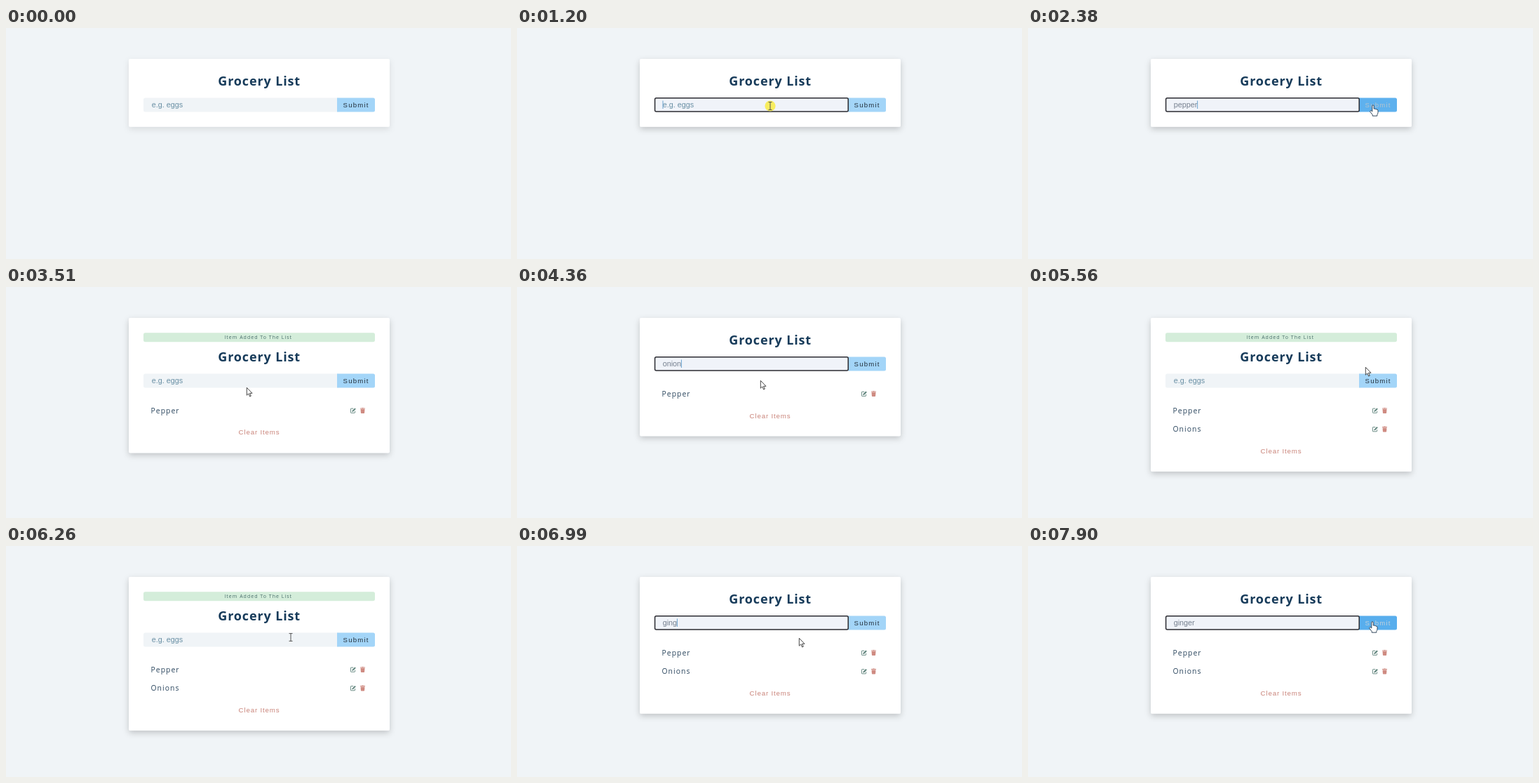
An HTML page for the animation above (8 s loop, 720x329 px).

```html
<!DOCTYPE html>
<html lang="en">
<head>
<meta charset="utf-8">
<title>Grocery List</title>
<style>
  html, body { margin: 0; width: 100%; height: 100%; overflow: hidden; background: #f0f4f7; }
  svg { display: block; width: 100vw; height: 100vh; }
  text { white-space: pre; }
  .sans { font-family: "Open Sans", "Noto Sans", sans-serif; }
  .ui { font-family: "Liberation Sans", Arial, sans-serif; }
  .title { font-size: 18px; font-weight: 700; letter-spacing: .86px; fill: #173b5a; }
  .note { font-size: 7px; letter-spacing: 1.02px; fill: #476c69; }
  .item { font-size: 10.4px; letter-spacing: 1.03px; fill: #2b465e; }
  .field { font-size: 10.8px; }
  .submit { font-size: 9.6px; letter-spacing: 1.2px; }
  .clear { font-size: 9.7px; letter-spacing: .84px; fill: #c98379; }
</style>
</head>
<body>
<svg viewBox="0 0 720 329">
  <defs>
    <filter id="shadow" x="-10%" y="-20%" width="120%" height="145%">
      <feDropShadow id="shade" dx="0" dy="3.3" stdDeviation="4.2" flood-color="#000"/>
    </filter>
    <g id="icons">
      <g transform="translate(490.7 147.8)">
        <path d="M4.6 1.4H1.3Q.7 1.4.7 2V7Q.7 7.6 1.3 7.6H6.3Q6.9 7.6 6.9 7V5" fill="none" stroke="#5d827a" stroke-width=".9"/>
        <path d="M2.9 4.5 6.7.7 8.1 2.1 4.3 5.9 2.7 6.1Z" fill="#5d827a"/>
      </g>
      <path transform="translate(505 147.8)" fill="#cf8b82" d="M0 .8H2L2.5.2H4.5L5 .8H7V1.8H0ZM.5 2.3H6.5L6.1 7.5Q6 8.2 5.4 8.2H1.6Q1 8.2.9 7.5Z"/>
    </g>
  </defs>
  <rect width="720" height="329" fill="#f0f4f7"/>
  <rect id="card" x="175" y="44" width="372" rx="2" fill="#fff" filter="url(#shadow)"/>
  <g id="note">
    <rect x="196" y="65.3" width="330" height="12.9" rx="2.6" fill="#d4edda"/>
    <text class="sans note" x="311.4" y="74.4">Item Added To The List</text>
  </g>
  <g id="body">
    <text class="sans title" x="302.3" y="82">Grocery List</text>
    <rect x="196" y="99.5" width="280" height="20" rx="2.5" fill="#f0f4f7"/>
    <path id="button" d="M472 99.5H523.5Q526 99.5 526 102V117Q526 119.5 523.5 119.5H472Z"/>
    <rect id="ring" x="196.6" y="99.8" width="275.6" height="19.2" rx="2" fill="#f0f3f9" stroke="#2c2c32" stroke-width="1.5"/>
    <text id="field" class="ui field" x="207.7" y="113"></text>
    <rect id="caret" y="103.5" width="1" height="11.5" fill="#6aa3cf"/>
    <text id="label" class="ui submit" x="480.6" y="113">Submit</text>
    <g id="item0"><text class="sans item" x="206.5" y="155.7">Pepper</text><use href="#icons"/></g>
    <g id="item1" transform="translate(0 26.5)"><text class="sans item" x="206.5" y="155.7">Onions</text><use href="#icons"/></g>
    <text id="clear" class="ui clear" x="331.6">Clear Items</text>
  </g>
  <g id="cursor">
    <circle id="press" r="7.6" fill="#f8ec4e" opacity=".9"/>
    <path id="arrow" d="M.3.3V11.2L2.8 8.9 4.6 13 6.3 12.2 4.5 8.3H8Z" fill="#fff" stroke="#333" stroke-width=".9" stroke-linejoin="round"/>
    <path id="beam" d="M-2.5-5.4H2.5M0-5.4V5.4M-2.5 5.4H2.5" fill="none" stroke="#555"/>
    <path id="hand" d="M-1.2 9V1Q-1.2-.2 0-.2T1.2 1V5.2Q2.4 4.4 3.2 5.6 4.4 4.9 5.1 6.2 6.8 6 7 7.4V10.4Q6.8 12.6 5.8 13.6V15.2H-.8V13.6L-4 9.6Q-4.6 8-3.4 7.6-2.4 7.6-1.2 9Z" fill="#fff" stroke="#2b4056" stroke-width=".95" stroke-linejoin="round"/>
  </g>
</svg>
<script>
const LOOP = 8000, FADE = 300, NOTICE = 1560;
const KEY_LEAD = 180, KEY_GAP = 112;
const NOTE_SHIFT = 23.9, ROW = 26.5;

const el = {};
document.querySelectorAll("[id]").forEach(n => el[n.id] = n);

// Each round: glide to rest, click the field, type, glide to the button, submit
const home = { x: 643, y: 301 };
const rounds = [
  { word: "pepper", rest: { x: 369, y: 125 }, field: { x: 361, y: 111 }, button: { x: 492, y: 110 },
    rested: 670, focus: 1150, leave: 1890, add: 2740 },
  { word: "onions", rest: { x: 343, y: 143 }, field: { x: 347, y: 133 }, button: { x: 481, y: 114 },
    rested: 3400, focus: 3700, leave: 4775, add: 5220 },
  { word: "ginger", rest: { x: 406, y: 130 }, field: { x: 402, y: 131 }, button: { x: 491, y: 108 },
    rested: 6260, focus: 6380, leave: 7335, add: Infinity }
];
const glides = rounds.flatMap(r => [
  { to: r.rest, end: r.rested, span: 600 },
  { to: r.field, end: r.focus, span: 100 },
  { to: r.button, end: r.leave + 300, span: 300 }
]);

const clamp = v => Math.min(1, Math.max(0, v));
const ease = v => v * v * (3 - 2 * v);
const between = (v, a, b) => v >= a && v < b;
const show = (node, on) => node.setAttribute("display", on ? "inline" : "none");
const mix = (a, b, k) => `rgb(${a.map((v, i) => Math.round(v + (b[i] - v) * k))})`;

function pointer(t) {
  return glides.reduce((p, g) => {
    const k = ease(clamp((t - g.end + g.span) / g.span));
    return { x: p.x + (g.to.x - p.x) * k, y: p.y + (g.to.y - p.y) * k };
  }, home);
}

function hover(t) {
  return Math.max(...rounds.map(r => {
    const enter = r.leave + 215;
    return clamp(clamp((Math.min(t, r.add) - enter) / FADE) - Math.max(0, t - r.add) / FADE);
  }));
}

function drawField(t) {
  const r = rounds.find(r => between(t, r.focus, r.add));
  const first = r ? r.focus + KEY_LEAD : 0;
  const typed = r ? Math.min(r.word.length, Math.max(0, Math.floor((t - first) / KEY_GAP) + 1)) : 0;
  const lastInput = typed ? first + (typed - 1) * KEY_GAP : r && r.focus;
  show(el.ring, r);
  el.field.textContent = typed ? r.word.slice(0, typed) : "e.g. eggs";
  el.field.setAttribute("fill", typed ? "#76808f" : "#6a90a5");
  show(el.caret, r && (t - lastInput) % 1000 < 500);
  el.caret.setAttribute("x", 207.5 + (typed ? el.field.getComputedTextLength() : 0));
}

function drawPointer(t, shift) {
  const { x, y } = pointer(t);
  const onRow = between(y, 99.5 + shift, 119 + shift);
  const onField = onRow && between(x, 196, 472);
  const onButton = onRow && between(x, 472, 526);
  show(el.cursor, t >= 100);
  el.cursor.setAttribute("transform", `translate(${x} ${y})`);
  show(el.hand, onButton);
  show(el.beam, onField);
  show(el.arrow, !onButton && !onField);
  show(el.press, rounds.some(r => [r.focus, r.add].some(c => between(t, c - 30, c + 120))));
}

function draw(t) {
  const count = rounds.filter(r => t >= r.add).length;
  const noted = rounds.some(r => between(t, r.add, r.add + NOTICE));
  const shift = noted ? NOTE_SHIFT : 0;
  el.card.setAttribute("height", 96.8 + shift + (count && 45 + ROW * count));
  el.shade.setAttribute("flood-opacity", .1 + .1 * clamp((t - 500) / FADE));
  el.body.setAttribute("transform", `translate(0 ${shift})`);
  show(el.note, noted);
  show(el.item0, count > 0);
  show(el.item1, count > 1);
  show(el.clear, count > 0);
  el.clear.setAttribute("y", 160 + ROW * count);

  const h = hover(t);
  el.button.setAttribute("fill", mix([163, 213, 248], [88, 174, 237], h));
  el.label.setAttribute("fill", mix([36, 49, 61], [193, 209, 220], h));
  drawField(t);
  drawPointer(t, shift);
}

const start = performance.now();
function tick() {
  draw((performance.now() - start) % LOOP);
  requestAnimationFrame(tick);
}
tick();
</script>
</body>
</html>
```
